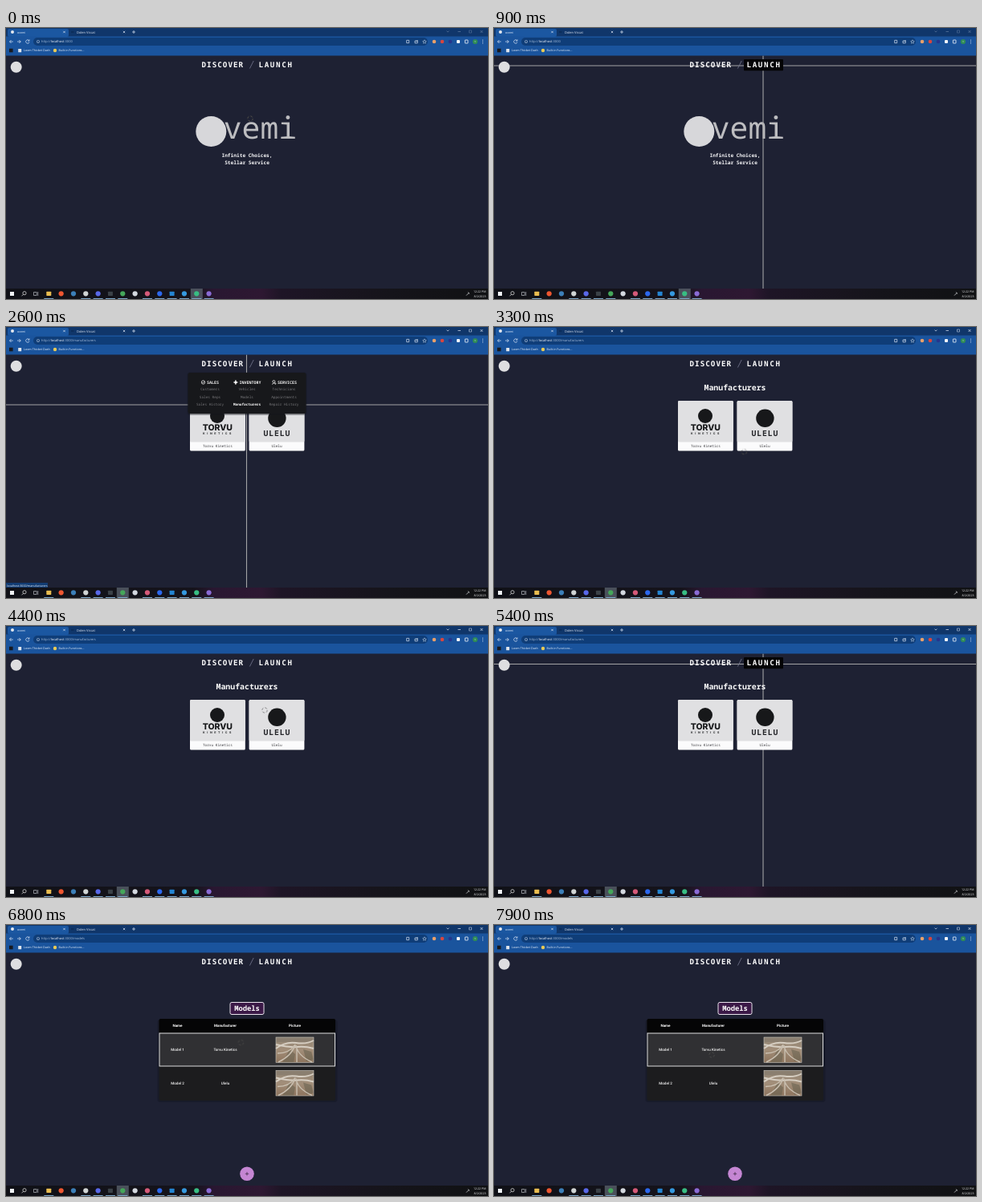
Write an HTML page that moves like this. It is 600 by 338 pixels and loops after 8 s.

```html
<!DOCTYPE html>
<html lang="en">
<head>
<meta charset="utf-8">
<title>Showroom demo</title>
<style>
  html, body { margin: 0; width: 100%; height: 100%; overflow: hidden; background: #1e2133; }
  svg { display: block; width: 100vw; height: 100vh; }
  text { text-rendering: geometricPrecision; }
  .ui { font-family: "Open Sans", "Noto Sans", sans-serif; }
  .mono { font-family: "Noto Sans Mono", "DejaVu Sans Mono", monospace; }
  .nav { font-family: "DejaVu Sans Mono", monospace; }
  .cell { font-family: Roboto, sans-serif; font-weight: 500; }
  .brand { font-family: Inter, sans-serif; font-weight: 800; }
  .bold { font-weight: 700; }
  .mid { text-anchor: middle; }
  .end { text-anchor: end; }
</style>
</head>
<body>
<svg id="stage" viewBox="0 0 600 338" preserveAspectRatio="none"></svg>
<script>
const LOOP = 8000, STEP = 100;
const stage = document.getElementById('stage');

// Markup helpers
const text = (x, y, s, size, fill, cls, extra = '') =>
  `<text x="${x}" y="${y}" font-size="${size}" fill="${fill}" class="${cls}" ${extra}>${s}</text>`;
const rect = (x, y, w, h, fill, r = 0, extra = '') =>
  `<rect x="${x}" y="${y}" width="${w}" height="${h}" rx="${r}" fill="${fill}" ${extra}/>`;
const dot = (x, y, r, fill, extra = '') =>
  `<circle cx="${x}" cy="${y}" r="${r}" fill="${fill}" ${extra}/>`;
const line = (d, color = '#dbe6f5', w = .7, extra = '') =>
  `<path d="${d}" fill="none" stroke="${color}" stroke-width="${w}" ${extra}/>`;
const group = (id, body) => `<g id="${id}">${body}</g>`;

function browser() {
  const cross = (x, y, r) => line(`M${x - r} ${y - r}l${2 * r} ${2 * r}m0 ${-2 * r}l${-2 * r} ${2 * r}`);
  const tools = [[533, '#e8a06a'], [543, '#d8453e'], [553, '#26358c']];
  const controls = line('M548.5 3.6l1.5 1.5 1.5-1.5M562.5 4.5h3.5') +
    line('M576.5 3h3v3h-3z', '#dbe6f5', .5) + cross(592, 4.5, 1.5);
  return rect(0, 0, 600, 11, '#10366a') +
    rect(2, 1, 76, 10, '#1b57a1', 2) +
    rect(0, 10.5, 600, 24, '#1a549d') +
    dot(8, 5, 2, '#e4e8ee') + text(14, 6.5, 'ovemi', 3.6, '#eef4ff', 'ui') +
    rect(81, 4.5, 3.5, 1, '#06244d') + text(88, 6.5, 'Dolen Viscat', 4, '#e3ebf7', 'ui') +
    cross(72.5, 5, 1.2) + cross(147, 5, 1.2) +
    line('M157 5h4M159 3v4') + group('controls', controls) +
    line('M8.8 17H4.5m2-2l-2 2 2 2M14 17h4.3m-2-2l2 2-2 2') +
    line('M28.6 15.6A2.2 2.2 0 1 0 29 17.6M29 14.3v1.8h-1.8') +
    rect(34, 12, 491, 10, '#0f3d78', 5) +
    dot(40, 17, 1.7, 'none', 'stroke="#c7d5e8" stroke-width=".5"') + line('M40 16.8v1.2', '#c7d5e8', .5) +
    group('url', '') +
    line('M498.7 15.3h3v3.4h-3zM509 16h3.3v2.8H509zm1.6 1l2-2') +
    line('M521 14.8l.7 1.5 1.6.2-1.2 1.1.3 1.6-1.4-.8-1.4.8.3-1.6-1.2-1.1 1.6-.2z', '#dbe6f5', .5) +
    tools.map(([x, c]) => dot(x, 17, 2.3, c)).join('') +
    rect(561, 15, 4, 4, '#f4f6fa', 1) + rect(571.4, 15, 3.6, 4, 'none', .3, 'stroke="#f4f6fa" stroke-width=".8"') +
    dot(584, 17, 3.1, '#2f8b57') + text(584, 18.3, 't', 3.4, '#fff', 'ui mid') +
    [15, 17, 19].map(y => dot(593.5, y, .5, '#e7eefa')).join('') +
    rect(4, 25.7, 4.6, 4.6, '#17191f') +
    rect(15.2, 26, 4, 4.2, '#dfe5ed', .5) + text(22, 29.4, 'Loom Thicket Dash', 3.7, '#f0f5fc', 'ui') +
    dot(61, 28, 2.2, '#e8ca55') + text(65.5, 29.4, 'Built-in Functions...', 3.6, '#f0f5fc', 'ui');
}

function taskbar() {
  const apps = ['#e9bd50', '#ee5630', '#3c7fb8', '#d0d4d4', '#5968e8', '#3b4147', '#45a65a',
    '#d4d8df', '#d55a79', '#2c68ee', '#2485d2', '#3599df', '#38bd83', '#8a6bd5'];
  const running = [0, 3, 4, 5, 6, 8, 9, 10, 11, 12, 13];
  const place = i => 53.3 + i * 15.33;
  return rect(0, 325, 600, 13, 'url(#bar)') +
    `<rect id="active" y="325" width="15" height="13" fill="#5c6570" opacity=".75"/>` +
    rect(5, 329, 5, 5, '#f0f3f6') +
    dot(23, 330.7, 2.1, 'none', 'stroke="#eee" stroke-width=".7"') + line('M21.5 332.3l-2 2', '#eee') +
    line('M34.5 329.5h3.6v4h-3.6zM39.7 329v5', '#d5d9df', .6) +
    apps.map((c, i) => i % 5 == 0 ? rect(place(i) - 3, 328.7, 6, 5.2, c, .6) : dot(place(i), 331.3, 3.1, c)).join('') +
    running.map(i => rect(place(i) - 6, 337, 12, 1, '#7ba6c8')).join('') +
    line('M573 333.6l3.3-3.3m-1.4-.8l2.2 2.1', '#e3e5e8') +
    text(597.5, 330.4, '12:22 PM', 3.6, '#f2f3f5', 'ui end') +
    text(597.5, 336.3, '8/2/2023', 3.6, '#f2f3f5', 'ui end');
}

const home = () =>
  dot(255.3, 129, 19, '#d7d7da') +
  text(270.8, 138, 'vemi', 38, '#bdbdc0', 'mono') +
  text(300, 161, 'Infinite Choices,', 6.2, '#f5f5f7', 'mono bold mid') +
  text(300, 170.3, 'Stellar Service', 6.2, '#f5f5f7', 'mono bold mid');

const card = (x, name, logo) =>
  rect(x, 92, 68.8, 62.4, '#fbfbfc', 1.5) +
  rect(x, 92, 68.8, 51.5, '#e0e0e2', 1.5) + logo +
  text(x + 34.4, 150.4, name, 4.4, '#38383c', 'mono mid');

const makers = () =>
  text(300, 79.3, 'Manufacturers', 9.9, '#fafafa', 'mono bold mid') +
  card(229, 'Torvu Kinetics', dot(263, 111, 9, '#17181a') +
    text(263.3, 129.2, 'TORVU', 10.5, '#17181a', 'brand mid') +
    text(264, 134, 'KINETICS', 3.6, '#3a3b3d', 'brand mid', 'letter-spacing="2.6"')) +
  card(302.6, 'Ulelu', dot(337.4, 113.8, 11.2, '#17181a') +
    text(337.4, 136, 'ULELU', 9.8, '#25262a', 'mono bold mid', 'letter-spacing=".9"'));

const photo = y => `<g transform="translate(336 ${y})">` +
  rect(0, 0, 47, 31.5, 'url(#land)') +
  rect(0, 0, 47, 6, '#81796a', 0, 'opacity=".5"') +
  `<path d="M17 15l7 6-2 10.5H8zM34 15l10 3 3 10-9 2z" fill="#66614f" opacity=".55"/>` +
  line('M0 14Q12 5 25 7T47 4M0 9Q18 13 27 12T47 14', '#d6cec2', 2) +
  line('M3 31Q20 23 24 9M45 31Q27 23 25 10M26 31V14M2 20Q17 20 23 10', '#c9bfb0', 1.4) +
  rect(0, 0, 47, 31.5, 'none', 0, 'stroke="#c9c5be" stroke-width=".6"') + '</g>';

function models() {
  const row = (y, name, maker) =>
    text(213.5, y, name, 4.6, '#f3f3f3', 'cell mid') + text(273, y, maker, 4.6, '#f3f3f3', 'cell mid');
  const head = (x, s) => text(x, 127.3, s, 4.6, '#fff', 'cell bold mid');
  return rect(279, 96.5, 42, 15, '#3b1947', 2, 'stroke="#e9e2ec"') +
    text(300, 107.2, 'Models', 8.8, '#fff', 'mono bold mid') +
    rect(188.5, 118, 224, 103, '#12141f', 4, 'opacity=".45"') +
    rect(190.5, 117, 219.5, 102, '#1c1c1e', 2.5) +
    rect(190.5, 117, 219.5, 17.5, '#050506', 2) +
    head(213.5, 'Name') + head(273, 'Manufacturer') + head(359.5, 'Picture') +
    `<rect id="row" x="191" y="135" width="218.5" height="41" fill="#303033" stroke="#f0f0f0" stroke-width=".9"/>` +
    row(157, 'Model 1', 'Torvu Kinetics') + row(198.7, 'Model 2', 'Ulelu') +
    photo(140) + photo(181.5) +
    dot(300, 310.3, 8.8, '#c586d3') + line('M297.8 310.3h4.4m-2.2-2.2v4.4', '#332139');
}

const columns = [
  [254, 250, 'SALES', ['Customers', 'Sales Reps', 'Sales History']],
  [300, 290.5, 'INVENTORY', ['Vehicles', 'Models', 'Manufacturers']],
  [346, 338, 'SERVICES', ['Technicians', 'Appointments', 'Repair History']]
];

function menu() {
  const icons = [
    dot(245.5, 69, 2.2, 'none', 'stroke="#fff" stroke-width=".7"') + line('M244.4 69l.8.9 1.5-1.7', '#fff'),
    line('M283.2 69h5.4M285.9 66.3v5.4', '#fff', 1.2) + dot(285.9, 69, 1.6, '#fff'),
    dot(333.4, 68, 1.5, 'none', 'stroke="#fff" stroke-width=".7"') + line('M331 71.5q2.3-3 5 0M334.4 69l2 2', '#fff')
  ];
  return rect(225.5, 56.5, 149, 53.5, '#12141f', 4, 'opacity=".35"') +
    rect(226.5, 57, 147, 51.2, '#17181b', 3) + columns.map(([mid, x, title, items], c) =>
    icons[c] + text(x, 71.1, title, 5, '#f7f7f7', 'mono bold') +
    items.map((s, r) => text(mid, 79 + r * 9.6, s, 4.4, '#77777a', 'mono mid', `id="item${c}${r}"`)).join('')
  ).join('');
}

stage.innerHTML = `<defs>
  <linearGradient id="bar"><stop offset="0" stop-color="#101117"/><stop offset=".39" stop-color="#15131b"/>
    <stop offset=".43" stop-color="#291731"/><stop offset=".53" stop-color="#2e1832"/><stop offset=".57" stop-color="#1e1526"/>
    <stop offset=".8" stop-color="#15141a"/><stop offset="1" stop-color="#101113"/></linearGradient>
  <linearGradient id="land" x2="0" y2="1"><stop offset="0" stop-color="#918575"/><stop offset=".5" stop-color="#a28e79"/>
    <stop offset="1" stop-color="#8d745d"/></linearGradient></defs>` +
  rect(0, 0, 600, 338, '#1e2133') +
  group('home', home()) +
  group('guides', line('M0 0h600', '#a3a3a5', 1.1, 'id="across"') + line('M0 34.5v290.5', '#a3a3a5', 1.1, 'id="down"')) +
  group('makers', makers()) + group('models', models()) +
  dot(12.7, 48.7, 7, '#dedee0') +
  rect(311, 39, 49, 14.3, '#040406', 1, 'id="button"') +
  text(243.5, 49.3, 'DISCOVER', 9.2, '#fff', 'nav bold', 'letter-spacing="1.05"') +
  line('M303.4 50.5l4.8-9.5', '#777990', .8) +
  text(314.5, 49.3, 'LAUNCH', 9.2, '#fff', 'nav bold', 'letter-spacing="1.65"') +
  group('menu', menu()) +
  `<g id="reticle" style="mix-blend-mode:difference">${dot(0, 0, 3.2, 'none', 'stroke="#888" stroke-width=".7" stroke-dasharray="3 2.03"')}</g>` +
  group('status', '') + browser() + taskbar();

const el = id => document.getElementById(id);
const show = (id, on) => el(id).setAttribute('opacity', +on);
const between = (v, a, b) => v >= a && v < b;
const ramp = (t, a, b) => Math.min(1, Math.max(0, (t - a) / (b - a)));
const pulse = (t, a, b, c, d) => ramp(t, a, b) - ramp(t, c, d);

// Pointer stops: time, x, y
const stops = [
  [0, 304, 113], [200, 304, 113], [800, 335, 47], [1400, 335, 47], [1800, 309.5, 73.8],
  [2200, 299.5, 97], [2700, 299.5, 97], [3200, 310, 158], [3800, 330, 126], [4400, 322, 105],
  [5100, 335, 47.5], [5600, 335, 47.5], [6100, 304.5, 89], [6500, 304.5, 89],
  [7000, 286, 178], [7500, 271, 162], [8000, 271, 162]
];

function pointer(t) {
  const i = stops.findIndex(s => s[0] > t);
  const [a, b] = [stops[i - 1], stops[i]];
  const k = ramp(t, a[0], b[0]), e = k * k * (3 - 2 * k);
  return [a[1] + (b[1] - a[1]) * e, a[2] + (b[2] - a[2]) * e];
}

function draw(t) {
  const [x, y] = pointer(t);
  const focused = t >= 1200;
  const page = t < 2400 ? 'home' : t < 6400 ? 'makers' : 'models';
  const path = { home: '', makers: '/manufacturers', models: '/models' }[page];
  const open = pulse(t, 1200, 1400, 2900, 3200) + pulse(t, 5500, 5700, 6400, 6700);
  for (const id of ['home', 'makers', 'models']) show(id, id == page);
  show('menu', open);
  show('button', pulse(t, 600, 700, 1500, 1840) + pulse(t, 4800, 4900, 5700, 6150));

  const onButton = between(x, 311, 360) && between(y, 39, 53.3);
  let onItem = false;
  columns.forEach(([mid], c) => [0, 1, 2].forEach(r => {
    const hit = open > .5 && Math.abs(x - mid) < 20 && between(y, 73 + r * 9.6, 82.6 + r * 9.6);
    const item = el(`item${c}${r}`);
    item.setAttribute('fill', hit ? '#fff' : '#77777a');
    item.style.fontWeight = hit ? 700 : 400;
    onItem ||= hit;
  }));
  const linked = onButton || onItem;
  show('guides', linked);
  show('reticle', !linked);
  el('across').setAttribute('transform', `translate(0 ${y})`);
  el('down').setAttribute('transform', `translate(${x} 0)`);
  el('reticle').setAttribute('transform', `translate(${x} ${y})`);
  show('row', between(x, 191, 410) && between(y, 135, 176));

  el('url').innerHTML = text(44, 18.4, `http://<tspan fill="#f4f8ff">localhost</tspan>:3000${path}`, 4, '#a9c0de', 'ui');
  const link = between(t, 2200, 3000) ? 'manufacturers' : between(t, 6000, 6500) ? 'models' : '';
  el('status').innerHTML = link &&
    rect(0, 319, link == 'models' ? 40 : 52, 6, '#123c73') +
    text(1.3, 323.5, `localhost:3000/${link}`, 3.6, '#f1f5fb', 'ui');
  show('controls', focused ? 1 : .4);
  el('active').setAttribute('x', focused ? 137.8 : 229.8);
}

function tick(now) {
  draw(Math.floor(now % LOOP / STEP) * STEP);
  requestAnimationFrame(tick);
}
draw(0);
requestAnimationFrame(tick);
</script>
</body>
</html>
```
